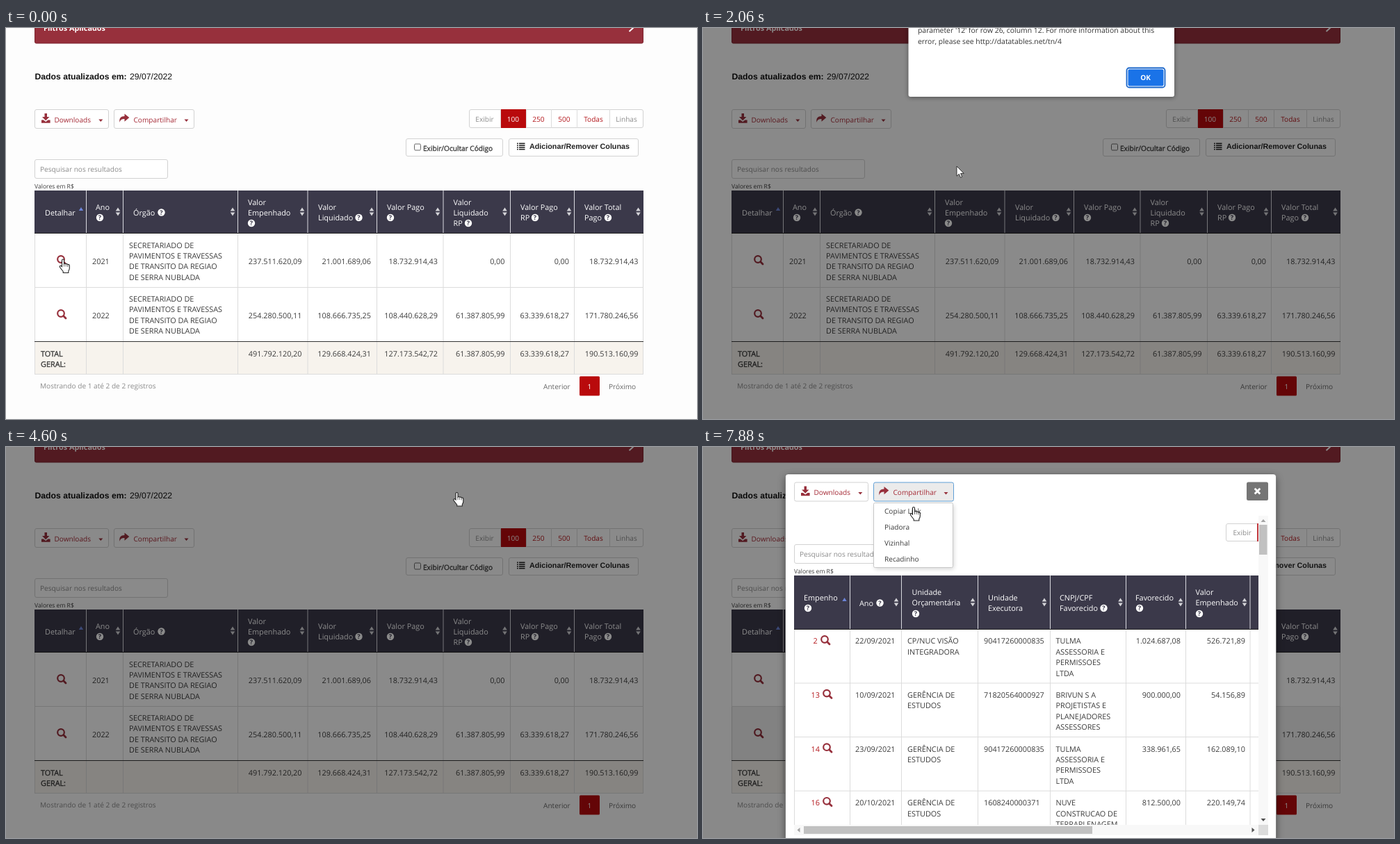
Recreate the animation shown at these times as an HTML page. Size 994 by 563 pixels, loop 8000 ms.

```html
<!DOCTYPE html>
<html lang="pt-BR">
<head>
<meta charset="utf-8">
<title>Consulta</title>
<style>
html, body { margin: 0; width: 100%; height: 100%; overflow: hidden; background: #fdfdfd; }
svg { display: block; width: 994px; height: 563px; }
text { font: 10.85px "Open Sans", "Noto Sans", sans-serif; fill: #3c3c3c; white-space: pre; text-rendering: geometricPrecision; }
.sm { font-size: 10.1px; }
.tiny { font-size: 8.6px; }
.alert { font-size: 10.4px; fill: #333; }
.ar { font: 12.2px "Liberation Sans", Arial, sans-serif; fill: #111; }
.b { font-weight: bold; }
.list { font-size: 10.75px; fill: #222; }
.semi { stroke: #3c3c3c; stroke-width: .35px; }
.head { fill: #fff; }
.gray { fill: #8b8b8b; }
.mid { fill: #666; }
.red { fill: #a52a36; }
.hot { fill: #b3161b; }
.end { text-anchor: end; }
.c { text-anchor: middle; }
.w { fill: #fff; }
</style>
</head>
<body>
<svg id="stage" viewBox="0 0 994 563"></svg>
<script>
const WINE = '#97303c', NAVY = '#3b394a', LINE = '#dcdcdc', STEP = 15.4;

const text = (x, y, s, cls = '') => `<text x="${x}" y="${y}" class="${cls}">${s}</text>`;
const lines = (x, y, list, cls) => list.map((s, i) => text(x, y + i * STEP, s, cls)).join('');
const rect = (x, y, w, h, fill, more = '') =>
  `<rect x="${x}" y="${y}" width="${w}" height="${h}" fill="${fill}" ${more}/>`;
const frame = (x, y, w, h, more = '') => rect(x + .5, y + .5, w, h, '#fff', `rx="2.5" stroke="#d2d2d2" ${more}`);
const path = (d, fill, more = '') => `<path d="${d}" fill="${fill}" ${more}/>`;
const stroke = (d, color, width, more = '') => path(d, 'none', `stroke="${color}" stroke-width="${width}" ${more}`);
const vline = (x, y1, y2, color = LINE) => stroke(`M${x} ${y1}V${y2}`, color, 1);
const hline = (y, x1, x2, color = LINE) => stroke(`M${x1} ${y}H${x2}`, color, 1);
const group = (id, body) => `<g id="${id}">${body}</g>`;

const help = (x, y) => `<circle cx="${x}" cy="${y}" r="5.2" fill="#fff"/>` +
  `<text x="${x}" y="${y + 3.3}" class="c b" style="font-size:9px;fill:${NAVY}">?</text>`;
const sorter = (x, y) =>
  path(`M${x - 3.3} ${y - 1}h6.6l-3.3 -5zM${x - 3.3} ${y + 1}h6.6l-3.3 5z`, '#d4d4d8');
const sortedUp = (x, y) => path(`M${x - 3.2} ${y + 2}h6.4l-3.2 -5z`, '#6c84d8');
const lens = (x, y) => `<circle cx="${x - 1}" cy="${y - 1}" r="4.8" fill="none" stroke="${WINE}" stroke-width="2.2"/>` +
  stroke(`M${x + 2.6} ${y + 2.6}L${x + 6} ${y + 6}`, WINE, 2.8, 'stroke-linecap="round"');
const caret = (x, y) => path(`M${x - 3} ${y - 1.5}h6l-3 3.4z`, WINE);

function buttons(x, y, id) {
  const down = path(`M${x + 14.5} ${y + 6}h3.5v5h3.4l-5.2 5.2l-5.2 -5.2h3.5zM${x + 10} ${y + 15.5}h3l3.2 2.6l3.2 -2.6h3.2v4.2h-12.6z`, WINE);
  const share = path(`M${x + 122.5} ${y + 19}c-1 -6 1.5 -9 7 -9v-3.5l6.8 5.6l-6.8 5.6v-3.6c-4 0 -6 1 -7 4.9z`, WINE);
  return frame(x, y, 106, 27, `id="${id}Down"`) + down + text(x + 28.5, y + 18.6, 'Downloads', 'sm red') + caret(x + 95.3, y + 16) +
    frame(x + 114, y, 115, 27, `id="${id}Share"`) + share + text(x + 142.5, y + 18.6, 'Compartilhar', 'sm red') + caret(x + 218.5, y + 16);
}
const search = (x, y) => frame(x, y, 191, 27) + text(x + 8, y + 18.4, 'Pesquisar nos resultados', 'sm gray') +
  text(x, y + 42, 'Valores em R$', 'tiny');

// Header cells: [x, first baseline, lines, help x, help y, sorter x]
const headers = (cells, sortY) => cells.map(([x, y, list, hx, hy, sx]) =>
  lines(x, y, list, 'head') + (hx ? help(hx, hy) : '') + sorter(sx, sortY)).join('');

function page() {
  const cols = [115.5, 168.5, 333.5, 434, 533.5, 629, 725.5, 817.5];
  const ends = [425.5, 525, 621, 717.5, 810, 909.5];
  const dept = ['SECRETARIADO DE', 'PAVIMENTOS E TRAVESSAS', 'DE TRANSITO DA REGIAO', 'DE SERRA NUBLADA'];
  const nums = (y, s) => s.split(' ').map((n, i) => text(ends[i], y, n, 'end')).join('');
  let s = rect(0, 0, 994, 563, '#fdfdfd');
  s += rect(41.5, -10, 875, 32, WINE, 'rx="2" stroke="#7d2530"') + text(54, 3.6, 'Filtros Aplicados', 'b w') +
    stroke('M896.5 -5L902 0L896.5 5', '#fff', 2);
  s += text(41.5, 74, 'Dados atualizados em:', 'ar b') + text(178, 74, '29/07/2022', 'ar');
  s += buttons(41, 117, 'page');

  s += frame(666, 117, 250, 26) + rect(711, 117, 37, 27, '#b90a0c');
  [711, 748, 784, 821, 868].forEach(x => s += vline(x + .5, 117, 144));
  [['Exibir', 688.5, 'gray'], ['100', 729.5, 'w'], ['250', 766, 'hot'], ['500', 803, 'hot'], ['Todas', 845, 'hot'], ['Linhas', 892.5, 'gray']]
    .forEach(([t, x, k]) => s += text(x, 134.5, t, 'sm c ' + k));

  s += frame(575, 159, 139, 25) + rect(587.5, 167, 9, 9, '#fff', 'rx="1.5" stroke="#666"') +
    text(600, 177, 'Exibir/Ocultar Código', 'sm semi');
  s += frame(723, 159, 186, 25) + text(753, 174, 'Adicionar/Remover Colunas', 'ar b list');
  for (let i = 0; i < 4; i++) {
    const y = 165.5 + i * 2.8;
    s += rect(735, y, 1.8, 1.6, '#222') + rect(738, y, 8.5, 1.6, '#222');
  }
  s += search(41, 189);

  s += rect(41, 295, 876, 156, '#fff') + rect(41, 451, 876, 47, '#f7f3ed') + rect(41, 234, 876, 61.5, NAVY);
  cols.forEach(x => s += vline(x, 234, 295, '#d9d9df') + vline(x, 296, 498));
  s += vline(41.5, 296, 498) + vline(916.5, 296, 498) + hline(373.5, 41, 917) + hline(498.5, 41, 917) +
    hline(295.5, 41, 917, '#222') + hline(451.5, 41, 917, '#333');
  s += text(56, 269.5, 'Detalhar', 'head') + sortedUp(108, 261);
  s += headers([
    [129, 262, ['Ano'], 135, 273, 161],
    [183, 269.5, ['Órgão'], 223.5, 265.5, 326],
    [348, 254.5, ['Valor', 'Empenhado'], 353, 281, 426],
    [449, 262, ['Valor', 'Liquidado'], 507.5, 273, 526],
    [548, 262, ['Valor Pago'], 553, 273, 621],
    [643.5, 254.5, ['Valor', 'Liquidado', 'RP'], 665, 281, 717.5],
    [740, 262, ['Valor Pago', 'RP'], 761, 273, 810],
    [832, 262, ['Valor Total', 'Pago'], 866, 273, 909.5]
  ], 264.5);
  s += lens(80, 334) + text(124, 340, '2021') + lines(177, 316.5, dept) +
    nums(340, '237.511.620,09 21.001.689,06 18.732.914,43 0,00 0,00 18.732.914,43');
  s += lens(80, 412) + text(124, 417.5, '2022') + lines(177, 394, dept) +
    nums(417.5, '254.280.500,11 108.666.735,25 108.440.628,29 61.387.805,99 63.339.618,27 171.780.246,56');
  s += lines(50, 472.5, ['TOTAL', 'GERAL:'], 'semi') +
    nums(472.5, '491.792.120,20 129.668.424,31 127.173.542,72 61.387.805,99 63.339.618,27 190.513.160,99');
  s += text(49, 518.5, 'Mostrando de 1 até 2 de 2 registros', 'sm gray') + text(773, 519.5, 'Anterior', 'sm mid') +
    rect(825, 501.5, 29, 28, '#b90a0c', 'rx="1.5"') + text(839.5, 519.5, '1', 'sm w c') + text(867, 519.5, 'Próximo', 'sm mid');
  return s;
}

function modal() {
  const cols = [211.5, 285.5, 395.5, 499.5, 608.5, 694.5, 787];
  const study = ['GERÊNCIA DE', 'ESTUDOS'];
  const tulma = ['TULMA', 'ASSESSORIA E', 'PERMISSOES', 'LTDA'];
  const rows = [
    ['2', '22/09/2021', ['CP/NUC VISÃO', 'INTEGRADORA'], '90417260000835', tulma, '1.024.687,08', '526.721,89'],
    ['13', '10/09/2021', study, '71820564000927', ['BRIVUN S A', 'PROJETISTAS E', 'PLANEJADORES', 'ASSESSORES'], '900.000,00', '54.156,89'],
    ['14', '23/09/2021', study, '90417260000835', tulma, '338.961,65', '162.089,10'],
    ['16', '20/10/2021', study, '1608240000371', ['NUVE', 'CONSTRUCAO DE', 'TERRAPLENAGEM'], '812.500,00', '220.149,74']
  ];
  let s = rect(119, 43, 705, 530, '#000', 'rx="4" opacity=".5" filter="url(#deep)"') +
    rect(118.5, 39, 706, 531, '#fff', 'rx="4" stroke="#000" stroke-opacity=".3"');
  s += buttons(131, 50.5, 'modal');
  s += rect(782, 50.5, 31, 26.5, '#757575', 'rx="2.5"') + stroke('M793.7 59.7L801.3 67.5M801.3 59.7L793.7 67.5', '#fff', 2.8);
  s += path('M798 110.5H755q-2.5 0 -2.5 2.5v20q0 2.5 2.5 2.5H798', '#fff', 'stroke="#d2d2d2"') +
    rect(797, 110, 2, 26, '#c23a3f') + text(762.5, 127, 'Exibir', 'sm gray');
  s += search(131, 140);

  let t = rect(131, 185, 668, 78, NAVY);
  cols.forEach(x => t += vline(x, 185, 263, '#d9d9df') + vline(x, 263, 544));
  t += vline(131.5, 263, 544) + hline(262.5, 131, 799, '#222');
  t += text(145, 221, 'Empenho', 'head') + help(151, 232) + sortedUp(203.5, 220);
  t += headers([
    [225, 228.5, ['Ano'], 254.5, 224.5, 278],
    [300.5, 213, ['Unidade', 'Orçamentária'], 306, 240, 388],
    [410, 221, ['Unidade', 'Executora'], 0, 0, 491],
    [513, 221, ['CNPJ/CPF', 'Favorecido'], 576.5, 232, 600.5],
    [622, 221, ['Favorecido'], 628, 232, 687],
    [708.5, 213, ['Valor', 'Empenhado'], 714, 240, 779]
  ], 223.5);
  rows.forEach(([id, day, unit, code, name, a, b], i) => {
    const y = 283.3 + i * 77.6, two = id.length > 1;
    t += text(two ? 155.5 : 158.5, y, id, 'hot') + lens(two ? 179 : 176, y - 5.3) + text(219, y, day) +
      lines(294, y, unit) + text(404, y, code) + lines(507.5, y, name) + text(687, y, a, 'end') + text(780, y, b, 'end');
    t += hline(340 + i * 77.6, 131, 799);
  });
  s += `<g clip-path="url(#view)">${t}</g>`;

  s += rect(799, 99, 14, 445, '#f8f8f8') + rect(131, 544, 668, 15, '#f8f8f8') + rect(799, 544, 14, 15, '#dcdcdc');
  s += rect(800, 112, 11.5, 43, '#c1c1c1') + rect(145, 546, 415, 11, '#c1c1c1');
  s += path('M802.5 108h7l-3.5 -4z', '#a3a3a3') + path('M802.5 535h7l-3.5 4z', '#505050') +
    path('M139.5 548v7l-4 -3.5z', '#a3a3a3') + path('M789.5 548v7l4 -3.5z', '#505050');
  s += group('menu', rect(247, 83, 114, 93, '#000', 'rx="2" opacity=".16" filter="url(#soft)"') +
    rect(245.5, 80.5, 114, 93, '#fff', 'rx="2" stroke="#c8c8c8"') +
    ['Copiar Link', 'Piadora', 'Vizinhal', 'Recadinho'].map((n, i) => text(261, 96 + i * 23, n, 'sm')).join(''));
  return s;
}

const alertBox = () => rect(295.5, -10, 382.5, 110, '#000', 'rx="3" opacity=".45" filter="url(#soft)"') +
  rect(295.5, -10, 382.5, 109, '#fff', 'rx="3"') +
  text(309, 6.5, "parameter '12' for row 26, column 12. For more information about this", 'alert') +
  text(309, 22.8, 'error, please see http://datatables.net/tn/4', 'alert') +
  rect(609.5, 57.5, 55, 28, '#fff', 'rx="3.5" stroke="#1b66c9" stroke-width="1.8"') +
  rect(611.5, 59.5, 51, 24, '#1a73e8', 'rx="2" id="ok"') + text(636.5, 75.3, 'OK', 'sm b w c');

const ARROW = 'M0 0V14.2L3.3 11.2L5.5 16.3L7.7 15.3L5.6 10.4H10.2Z';
const HAND = 'M-1.5 10.5V1.5Q-1.5 0 0 0T1.5 1.5V6.5Q3 5.3 4.2 6.8Q5.8 6 6.8 7.6Q9.3 7 9.3 9.5V13Q9.3 15 7.8 17V19.5H.2V17.5Q-2.2 14.8 -4.6 11.3Q-5 9 -3 9.3Z';
const KNUCKLES = 'M4.2 7V10.5M6.8 8V11M1.5 6.5V10.5';

const blur = (id, size) => `<filter id="${id}" x="-20%" y="-20%" width="140%" height="140%"><feGaussianBlur stdDeviation="${size}"/></filter>`;
document.getElementById('stage').innerHTML =
  `<defs>${blur('soft', 3)}${blur('deep', 6)}<clipPath id="view">${rect(131, 185, 668, 359, '#000')}</clipPath></defs>` +
  page() + rect(0, 0, 994, 563, '#000', 'id="dim"') + rect(41, 374, 876, 77, '#000', 'id="stripe" opacity=".06"') +
  group('modal', modal()) + group('alert', alertBox()) +
  group('cursor', group('arrow', path(ARROW, '#fff', 'stroke="#222" stroke-width=".9"')) +
    group('hand', path(HAND, '#fff', 'stroke="#222" stroke-width="1.1"') + stroke(KNUCKLES, '#222', .7)));

const $ = id => document.getElementById(id);
const show = (id, on) => $(id).style.display = on ? '' : 'none';
const at = (steps, t) => steps.reduce((v, s) => t >= s[0] ? s[1] : v, steps[0][1]);

const DIM = [[0, 0], [150, .2], [300, .46]];
// Modal: [vertical offset, opacity]
const SLIDE = [[0, null], [4750, [-45, .5]], [4900, [-15, 1]], [5050, [0, 1]]];
const OK = [[0, '#1a73e8'], [2510, '#2678e6'], [2660, '#2f7fe6'], [3690, '#5a98ea'], [3840, '#4288e8'], [3990, '#2f7fe6']];

// Cursor: [shape, x, y] at each step
const CURSOR = [[0, ['hand', 82, 333]], [600, ['arrow', 82, 333]]];
for (let i = 1; i <= 8; i++) {
  const k = i / 8, e = k * k * (3 - 2 * k);
  CURSOR.push([1480 + (i - 1) * 147, ['arrow', 82 + 566 * e, 333 - 268 * e]]);
}
CURSOR.push(
  [4600, ['hand', 648.5, 65.5]], [5510, ['arrow', 640, 68]], [5660, ['arrow', 619, 63]],
  [5940, ['arrow', 530, 78]], [6090, ['arrow', 330, 94]], [6240, ['arrow', 180.5, 85.5]],
  [6390, ['hand', 176, 72]], [6530, ['hand', 190, 66]], [6680, ['hand', 226, 64]],
  [6820, ['hand', 300, 65]], [6970, ['hand', 342, 66]], [7880, ['hand', 303, 86.5]]);

function draw(t) {
  $('dim').setAttribute('opacity', at(DIM, t));
  show('alert', t >= 450 && t < 4300);
  $('ok').setAttribute('fill', at(OK, t));

  const slide = at(SLIDE, t);
  show('modal', slide);
  show('stripe', slide);
  if (slide) {
    $('modal').setAttribute('transform', `translate(0 ${slide[0]})`);
    $('modal').setAttribute('opacity', slide[1]);
  }
  $('modalDown').setAttribute('fill', t >= 6390 && t < 6820 ? '#ebebeb' : '#fff');
  $('modalShare').setAttribute('fill', t >= 6820 ? '#ebebeb' : '#fff');
  $('modalShare').setAttribute('stroke', t >= 7260 ? '#5f9fd6' : '#d2d2d2');
  show('menu', t >= 7410);

  const [shape, x, y] = at(CURSOR, t);
  $('cursor').setAttribute('transform', `translate(${x} ${y})`);
  show('arrow', shape === 'arrow');
  show('hand', shape === 'hand');
}

const start = performance.now();
function tick() {
  draw((performance.now() - start) % 8000);
  requestAnimationFrame(tick);
}
tick();
</script>
</body>
</html>
```
